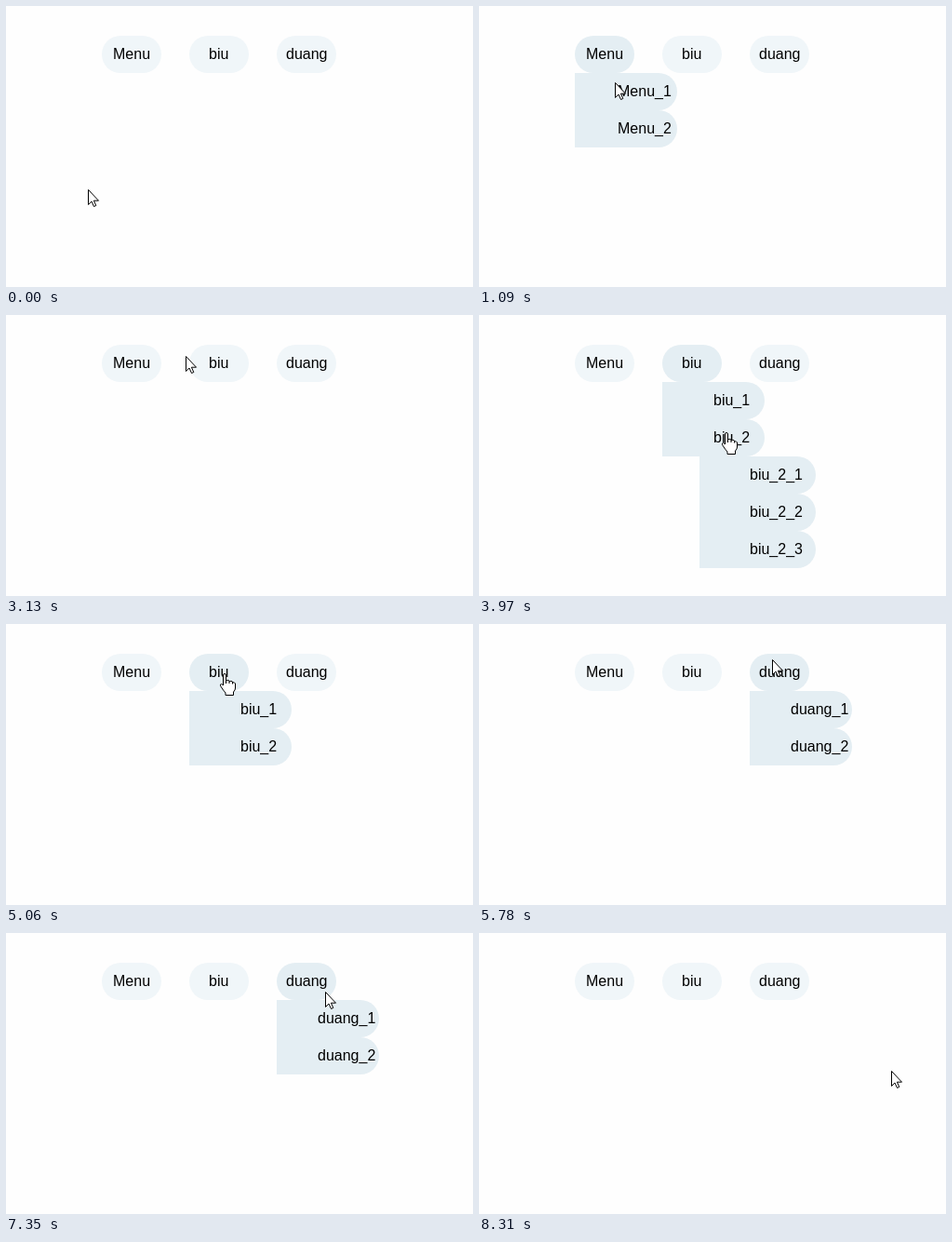
These frames come from a looping animation (502 px wide and 302 px high, 8.41 s). An HTML page with a canvas:

```html
<!DOCTYPE html>
<html lang="en">
<head>
<meta charset="utf-8">
<title>Dropdown menu</title>
<style>
  html, body { margin: 0; width: 100%; height: 100%; overflow: hidden; background: #fefefe; }
  canvas { display: block; }
</style>
</head>
<body>
<canvas id="stage" width="502" height="302"></canvas>
<script>
const ctx = document.getElementById('stage').getContext('2d');
const LOOP = 8410, STEP = 120, REST = 250;
const TOP = 32, ROW = 40, PILL = 64, LIST = 110, SUBLIST = 125, INDENT = 40;
const IDLE = '#f0f6f9', ACTIVE = '#e4eef3', PAGE = '#fefefe';
const FONT = '16px "Liberation Sans", Arial, sans-serif';

const menus = ['Menu', 'biu', 'duang'].map((name, i) => ({ name, x: 103 + 94 * i }));
const rowY = n => TOP + ROW * n;

// Turning points of the pointer; it moves evenly between them.
const turns = [
  { step: 0, x: 88, y: 197 },
  { step: 6, x: 133, y: 55 },
  { step: 8, x: 146, y: 82 },
  { step: 16, x: 193, y: 119 },
  { step: 24, x: 150, y: 33 },
  { step: 25, x: 193, y: 44 },
  { step: 32, x: 266, y: 126 },
  { step: 34, x: 276, y: 139, rest: true },
  { step: 40, x: 235, y: 53 },
  { step: 42, x: 242, y: 24 },
  { step: 45, x: 306, y: 20 },
  { step: 51, x: 361, y: 127 },
  { step: 53, x: 368, y: 138, rest: true },
  { step: 59, x: 338, y: 48 },
  { step: 61, x: 354, y: 23 },
  { step: 66, x: 443, y: 148 }
];

const arrow = new Path2D('M.5 .5V16.5L4 13L6.5 18.5L8.8 17.5L6.4 12.2H11.5Z');
const hand = new Path2D('M-1.5 13V2Q-1.5 .5 0 .5T1.5 2V8Q3 6.5 5 8V9Q7 7.5 8.5 9V10' +
  'Q10.5 9 11.5 11V16Q11.5 18 9.5 20V23.5H1V21Q-1 19 -4.5 13.5' +
  'Q-5 11.5 -3.5 11.5Q-2.5 11.5 -1.5 13Z');
const knuckles = new Path2D('M1.5 8V11M5 9V11M8.5 10V11.5');

function pointerAt(step) {
  const i = Math.max(1, turns.findIndex(t => t.step >= step));
  const a = turns[i - 1], b = turns[i];
  const k = (step - a.step) / (b.step - a.step);
  const mix = key => Math.round(a[key] + (b[key] - a[key]) * k);
  return { x: mix('x'), y: mix('y') };
}

function inside(p, x, y, w, h) {
  return p.x >= x && p.x < x + w && p.y >= y && p.y < y + h;
}

function label(text, x, w, row) {
  const width = ctx.measureText(text).width;
  return { text, width, x: Math.round(x + (w - width) / 2), y: rowY(row) };
}

function labelsFor({ name, x }, isOpen, sub) {
  const list = [label(name, x, PILL, 0)];
  if (isOpen)
    for (let i = 1; i <= 2; i++)
      list.push(label(`${name}_${i}`, x + INDENT, LIST - INDENT, i));
  if (sub)
    for (let i = 1; i <= 3; i++)
      list.push(label(`${name}_2_${i}`, x + 2 * INDENT, SUBLIST - INDENT, i + 2));
  return list;
}

// Follow the pointer through one loop, opening and closing menus by hit test.
function buildStates() {
  let open, sub = false, start = 0;
  return Array.from({ length: turns.at(-1).step + 1 }, (_, step) => {
    const p = pointerAt(step);
    const inSub = open && sub && inside(p, open.x + INDENT, rowY(3), SUBLIST, 3 * ROW);
    const inList = open && inside(p, open.x, rowY(1), LIST, 2 * ROW);
    if (!inSub && !inList) open = menus.find(m => inside(p, m.x, TOP, PILL, ROW));
    sub = Boolean(inSub || (inList && p.y >= rowY(2)));
    const pointing = Boolean(open) && labelsFor(open, true, sub)
      .some(l => inside(p, l.x, l.y + 11, l.width, 18));
    const state = { start, p, open, sub, pointing };
    const resting = step === 0 || turns.some(t => t.rest && t.step === step);
    start += resting ? REST : STEP;
    return state;
  });
}

function box(x, row, w, radii, color) {
  ctx.fillStyle = color;
  ctx.beginPath();
  ctx.roundRect(x, rowY(row), w, ROW, radii);
  ctx.fill();
}

function drawMenu(menu, isOpen, sub) {
  const tab = [0, 20, 20, 0];
  box(menu.x, 0, PILL, 20, isOpen ? ACTIVE : IDLE);
  if (isOpen)
    for (let row = 1; row <= 2; row++) box(menu.x, row, LIST, tab, ACTIVE);
  if (sub)
    for (let row = 3; row <= 5; row++) box(menu.x + INDENT, row, SUBLIST, tab, ACTIVE);
  ctx.fillStyle = '#000';
  for (const l of labelsFor(menu, isOpen, sub)) ctx.fillText(l.text, l.x, l.y + 25);
}

function drawPointer({ x, y }, pointing) {
  const shape = pointing ? hand : arrow;
  ctx.save();
  ctx.translate(x, y);
  ctx.fillStyle = '#fff';
  ctx.strokeStyle = '#000';
  ctx.fill(shape);
  ctx.stroke(shape);
  if (pointing) ctx.stroke(knuckles);
  ctx.restore();
}

ctx.font = FONT;
const states = buildStates();

function draw(time) {
  const { p, open, sub, pointing } = states.findLast(s => s.start <= time);
  ctx.fillStyle = PAGE;
  ctx.fillRect(0, 0, 502, 302);
  for (const m of menus) drawMenu(m, m === open, m === open && sub);
  drawPointer(p, pointing);
}

const begin = performance.now();
function tick() {
  draw((performance.now() - begin) % LOOP);
  requestAnimationFrame(tick);
}
tick();
</script>
</body>
</html>
```
